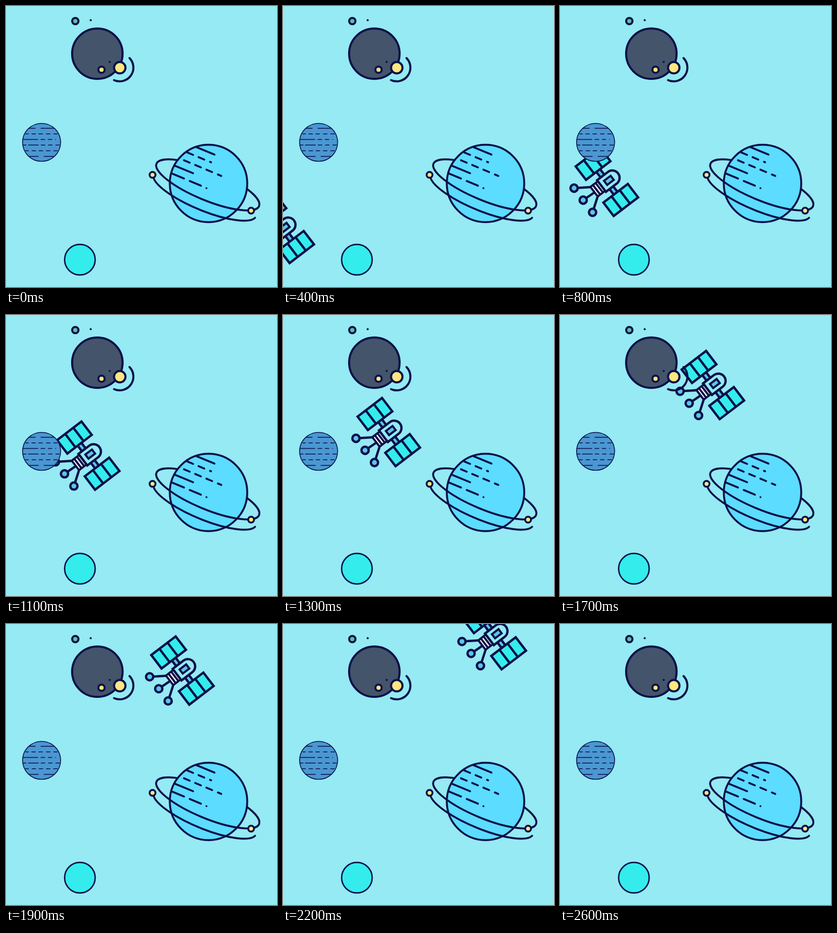
Write an HTML page that moves like this. It is 520 px wide and 540 px high and loops after 3.6 s.

```html
<!DOCTYPE html>
<html lang="en">
<head>
<meta charset="utf-8">
<title>Satellite among planets</title>
<style>
  html, body { margin: 0; width: 100%; height: 100%; overflow: hidden; background: #95eaf3; }
  svg { display: block; width: 520px; height: 540px; stroke: #0c1148; stroke-linecap: round; fill: none; }
  .dot { fill: #0c1148; stroke: none; }
  .yellow { fill: #ffe680; }
  .cyan { fill: #34ecec; }
  .pale { fill: #95eaf3; }
  .glass { fill: #5cc4ec; }
</style>
</head>
<body>
<svg viewBox="0 0 520 540">
  <g id="satellite" stroke-width="4.5">
    <path d="M140 237L172 235M157.5 260L178 246M175.5 283.5L185 254"/>
    <g class="glass">
      <circle cx="140" cy="237" r="6.9"/>
      <circle cx="157.5" cy="260" r="6.9"/>
      <circle cx="175.5" cy="283.5" r="6.9"/>
    </g>
    <g transform="translate(203 225) rotate(-37.4)" stroke-linecap="butt">
      <rect class="glass" x="-4.5" y="-44" width="9" height="88"/>
      <path class="cyan" d="M-29.5-60h59v32.5h-59zM-9.8-60v32.5M9.8-60v32.5"/>
      <path class="cyan" d="M-29.5 27.5h59v32.5h-59zM-9.8 27.5v32.5M9.8 27.5v32.5"/>
      <path fill="#fff" stroke-width="4" d="M-31-11.5h18v23h-18zM-25-11.5v23M-18.5-11.5v23"/>
      <path class="pale" d="M-13-14H13A14 14 0 0 1 13 14H-13z"/>
      <rect class="glass" stroke-width="4" x="-3.2" y="-5" width="16" height="10"/>
    </g>
  </g>

  <g stroke-width="4">
    <circle cx="175.3" cy="91.6" r="48.4" fill="#44546b"/>
    <circle cx="133" cy="29" r="6" fill="#5dbfa8"/>
    <circle class="dot" cx="162.5" cy="27.2" r="2"/>
    <circle class="dot" cx="199" cy="107.6" r="2"/>
    <circle class="yellow" cx="183.3" cy="122.4" r="6"/>
    <path d="M237 100A26.4 26.4 0 0 1 207.3 142.5"/>
    <circle class="yellow" cx="218.3" cy="118.6" r="11"/>
  </g>

  <g stroke-width="1.6">
    <circle cx="68.3" cy="262" r="36.5" fill="#4a97d2"/>
    <path d="M44 235H56M67 235H92
      M38 245.8h5M49.500 245.800h7M63 245.800h7M77.500 245.800h7M91.500 245.800h7
      M33 256.500H61M67 256.500h7.500M81 256.500h7M95 256.500h.2
      M32.500 267.300h6M43 267.300H62M67.500 267.300h7M81.500 267.300h7M95.500 267.300h7
      M37 278.200h6M50 278.200h7M63.500 278.200h7M77.500 278.200h7M91.500 278.200h7
      M44 289H62M73 289H92"/>
  </g>

  <circle class="cyan" cx="141.8" cy="487.5" r="29.3" stroke-width="2.7"/>

  <g stroke-width="3.7">
    <circle cx="388.6" cy="341" r="74.3" fill="#5cdcff"/>
    <path d="M366 271.500l34 14
      M348 281.500l11 4.600M369.500 290.500l11 4.600M391.500 299.500l2 .8
      M341.500 296.500l11 4.600M363 305.500l11 4.600M384.500 314.500l11 4.600M406.500 323.800l6.500 2.700
      M323.500 306.800l35.500 14.600
      M318 321.800l23.500 9.700M352.500 336.300l21.500 9M384.600 350h.1"/>
    <path d="M328 296A106.500 29.500 22.500 1 0 463 352"/>
    <path d="M283 330A106.500 29.500 22.500 0 0 478 407"/>
    <circle class="yellow" cx="281.2" cy="324.4" r="5.6"/>
    <circle class="yellow" cx="470.3" cy="393.2" r="5.6"/>
  </g>
</svg>
<script>
  const LOOP = 3600, STEP = 100, SPEED = 22.6, HOME = 13;
  const satellite = document.getElementById('satellite');

  // Straight diagonal flight, advancing ten times a second.
  function draw(now) {
    const d = (Math.floor((now % LOOP) / STEP) - HOME) * SPEED;
    satellite.setAttribute('transform', `translate(${d} ${-d})`);
    requestAnimationFrame(() => draw(performance.now() - start));
  }
  const start = performance.now();
  draw(0);
</script>
</body>
</html>
```
